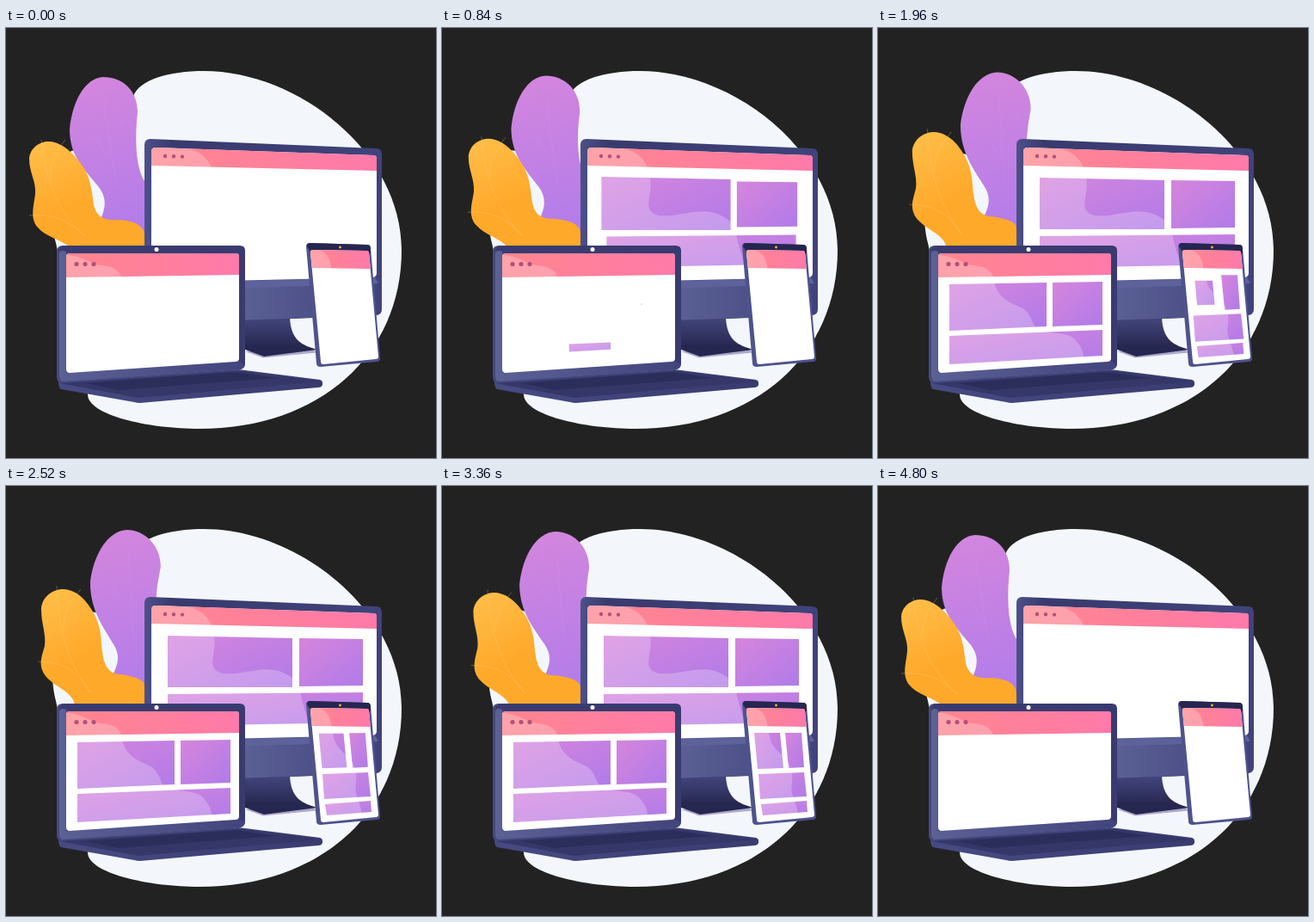
Animation, 500 px wide and 500 px high, one loop 4840 ms. Source, as an HTML page:

```html
<!DOCTYPE html>
<html lang="en">
<head>
<meta charset="utf-8">
<title>Responsive screens</title>
<style>
html, body { margin: 0; height: 100%; overflow: hidden; background: #222; }
svg { display: block; width: 100%; height: 100%; }
.shine { fill: #fff; fill-opacity: .24; }
.dots { fill: #b0527a; }
.vein { fill: none; stroke-width: .7; }
</style>
</head>
<body>
<svg viewBox="0 0 500 500">
  <defs>
    <linearGradient id="purple" x2="0.1" y2="1"><stop stop-color="#d486dd"/><stop offset="1" stop-color="#b27cea"/></linearGradient>
    <linearGradient id="orange" x2=".5" y2="1"><stop stop-color="#ffbf4a"/><stop offset=".6" stop-color="#ffa92b"/></linearGradient>
    <linearGradient id="pink"><stop stop-color="#ff858d"/><stop offset="1" stop-color="#ff7aaa"/></linearGradient>
    <linearGradient id="tile" x2="1" y2="1"><stop stop-color="#d685dc"/><stop offset="1" stop-color="#b07be9"/></linearGradient>
    <linearGradient id="chin"><stop stop-color="#5b6095"/><stop offset="1" stop-color="#42457c"/></linearGradient>
    <linearGradient id="frame"><stop stop-color="#4c5189"/><stop offset=".12" stop-color="#383a6e"/><stop offset="1" stop-color="#40437b"/></linearGradient>
    <linearGradient id="stand" x2="0" y2="1"><stop stop-color="#44477e"/><stop offset=".75" stop-color="#262750"/></linearGradient>
    <linearGradient id="deck"><stop stop-color="#474b83"/><stop offset="1" stop-color="#393b70"/></linearGradient>
  </defs>

  <path fill="#f3f7fb" d="M148 80C154 60 190 50 230 50C340 50 460 145 460 258C460 380 365 466 225 466C165 466 95 450 95 426L58 250C51 225 50 165 73 145C82 138 92 147 106 147C143 148 146 105 148 80Z"/>

  <path id="leafTall" fill="url(#purple)"/>
  <path id="veinTall" class="vein" stroke="#d79bea" stroke-opacity=".3"/>
  <path id="leafLow" fill="url(#orange)"/>
  <path id="veinLow" class="vein" stroke="#ffcf7c" stroke-opacity=".45"/>

  <g id="monitor">
    <path fill="#aaa9cb" d="M278 376L299 383.6L361 377.6L355 372Z"/>
    <path fill="url(#stand)" d="M270 338L330 336C331 364 345 369 362 374L300 382L270 371Z"/>
    <path fill="url(#frame)" d="M161 136Q161 129 168 129L430 140Q437 140 437 147V327Q437 333 431 334L161 345Z"/>
    <path fill="url(#chin)" d="M270 302L431 297V334L270 340Z"/>
    <path fill="#5d629b" d="M270 294L429 290L433 297L270 303Z"/>
    <path fill="#fff" d="M169 144Q169 139 174 139L427 148Q431 148 431 152V285Q431 289 427 290L169 296Z"/>
    <path fill="url(#pink)" d="M169 144Q169 139 174 139L427 148Q431 148 431 152V166L169 160Z"/>
    <g class="tiles"></g>
    <path class="shine" d="M169 144Q169 139 174 139L209 140C228 143 239 155 241 170C246 187 238 200 241 210C250 229 290 209 312 214C332 218 343 230 343 244C346 258 350 266 352 277L169 280Z"/>
    <g class="dots"><circle cx="185" cy="149" r="2.2"/><circle cx="195" cy="149.3" r="2.2"/><circle cx="205" cy="149.6" r="2.2"/></g>
  </g>

  <g id="laptop">
    <path fill="url(#deck)" d="M61 411L270 397L365 409Q368 410 368 412V415Q367 418 363 418L156 436Q152 436 149 435L64 420Q61 418 61 411Z"/>
    <path fill="#353768" d="M62 413L274 399L366 411L154 430Z"/>
    <path fill="#2b2d5b" d="M93 413L267 400L314 407L130 421Z"/>
    <path fill="#45497f" d="M59 260Q59 253 66 253H90V408L66 412Q59 413 59 406Z"/>
    <path fill="#393b70" d="M62 260Q62 253 69 253H272Q278 253 278 259V390Q278 396 272 397L67 411Q62 411 62 405Z"/>
    <path fill="url(#chin)" d="M62 262Q63 257 70 260V401L271 388L278 391Q277 396 272 397L67 411Q62 411 62 405Z"/>
    <path fill="#fff" d="M70 266Q70 262 74 262H267Q271 262 271 266V384Q271 388 267 388L74 401Q70 401 70 397Z"/>
    <path fill="url(#pink)" d="M70 266Q70 262 74 262H267Q271 262 271 266V287L70 290Z"/>
    <g class="tiles"></g>
    <path class="shine" d="M70 264C88 264 98 275 112 276Q130 278 134 289C137 313 151 318 164 324C179 330 178 343 184 349C200 358 224 351 232 366Q239 374 239 383L70 393Z"/>
    <g class="dots"><circle cx="82" cy="274.5" r="2.6"/><circle cx="92" cy="274.5" r="2.6"/><circle cx="102" cy="274.5" r="2.6"/></g>
    <circle cx="175" cy="257.5" r="2.5" fill="#fff"/>
  </g>

  <g id="phone">
    <path fill="#4e538d" d="M349 254Q349 250 353 250L420 252Q424 252 424 256L435 384Q435 388 431 388L366 394Q361 394 361 390Z"/>
    <path fill="#262650" d="M350 254Q350 250 354 250L420 252Q424 252 424 257V262L354 260Z"/>
    <path fill="#fff" d="M354 261Q354 258 357 258L419 259Q422 259 422 262L433 382Q433 385 430 385L369 391Q366 391 366 388Z"/>
    <path fill="url(#pink)" d="M354 261Q354 258 357 258L419 259Q422 259 422 262L424 280L356 279Z"/>
    <g class="tiles"></g>
    <path class="shine" d="M354 261Q354 258 357 258H363C377 262 377 272 380 287C383 307 394 309 401 319C414 338 402 348 409 363L415 383L367 388Z"/>
    <circle cx="388.5" cy="255" r="1.4" fill="#ffb43a"/>
  </g>
</svg>
<script>
const LOOP = 4840;
const byId = id => document.getElementById(id);

// Each leaf path bends between its left and right pose.
const bends = {
  leafTall: [
    'M113 57C135 57 153 72 153 98C150 125 150 160 161 178L165 255L110 255L110 222C118 205 115 195 108 185C92 165 74 150 74 118C77 85 92 58 113 57Z',
    'M141 51C160 51 180 68 180 94C176 115 174 125 175 145L175 255L122 255L124 220C132 205 132 195 125 184C114 165 98 145 98 112C102 80 118 52 141 51Z'],
  veinTall: [
    'M115 82Q117 125 130 185M99 122L122 155M138 105L119 130',
    'M143 76Q145 120 149 180M123 116L144 150M166 99L146 125'],
  leafLow: [
    'M50 132C68 133 82 150 90 162C100 178 100 195 102 205C105 222 118 224 130 223C150 224 160 230 161 240L161 260L75 255C65 247 45 242 37 232C27 221 33 205 34 192C35 178 27 168 27 152C28 140 38 132 50 132Z',
    'M67 120C84 121 95 135 102 148C112 166 110 180 112 192C114 212 122 219 134 219C152 222 161 226 161 232L161 260L80 255C78 240 60 235 50 225C35 211 42 198 45 186C47 172 41 160 41 143C42 128 55 120 67 120Z'],
  veinLow: [
    'M41 130Q48 205 92 242M69 130Q50 150 52 178M27 218Q65 214 92 242',
    'M59 116Q62 195 98 240M87 120Q66 142 67 166M37 204Q78 203 98 240']
};

// Tiles: points, time of appearing, time of fading.
const tiles = {
  monitor: [
    ['188,174 333,177 333,234 188,234', 365, 4040],
    ['341,177 415,178 415,232 341,233', 130, 4070],
    ['188,242 415,240 415,275 188,279', 0, 4000]],
  laptop: [
    ['83,298 196,296 196,347 83,352', 908, 4030],
    ['203,296 261,295 261,345 203,347', 808, 3980],
    ['83,358 261,351 261,381 83,391', 708, 3880]],
  phone: [
    ['363,287 393,287 397,328 367,329', 1720, 3580],
    ['399,287 418,287 421,327 403,328', 1620, 3540],
    ['368,335 421,333 424,361 370,364', 1520, 3480],
    ['371,370 424,366 425,379 373,383', 1420, 3400]]
};

const boxes = Object.entries(tiles).flatMap(([device, list]) =>
  list.map(([points, start, fade]) => {
    const el = document.createElementNS('http://www.w3.org/2000/svg', 'polygon');
    el.setAttribute('points', points);
    el.setAttribute('fill', 'url(#tile)');
    byId(device).querySelector('.tiles').append(el);
    const { x, y, width, height } = el.getBBox();
    return { el, start, fade, cx: x + width / 2, cy: y + height / 2 };
  }));

const clamp = v => Math.min(1, Math.max(0, v));
const smooth = v => (v = clamp(v), v * v * (3 - 2 * v));

// Grow past full size, dip below it, settle.
const pop = t => 1.05 * smooth(t / 400) - 0.1 * smooth((t - 400) / 320) + 0.05 * smooth((t - 720) / 280);

function mix(a, b, k) {
  const ends = b.match(/[\d.]+/g);
  let i = 0;
  return a.replace(/[\d.]+/g, n => (+n + (ends[i++] - n) * k).toFixed(2));
}

function draw(now) {
  const t = now % LOOP;
  const sway = (1 - Math.cos(2 * Math.PI * t / LOOP)) / 2;
  for (const id in bends) byId(id).setAttribute('d', mix(...bends[id], sway));
  for (const { el, start, fade, cx, cy } of boxes) {
    el.setAttribute('transform', `translate(${cx} ${cy}) scale(${pop(t - start)}) translate(${-cx} ${-cy})`);
    el.setAttribute('opacity', 1 - clamp((t - fade) / 400));
  }
  requestAnimationFrame(draw);
}
draw(performance.now());
</script>
</body>
</html>
```
